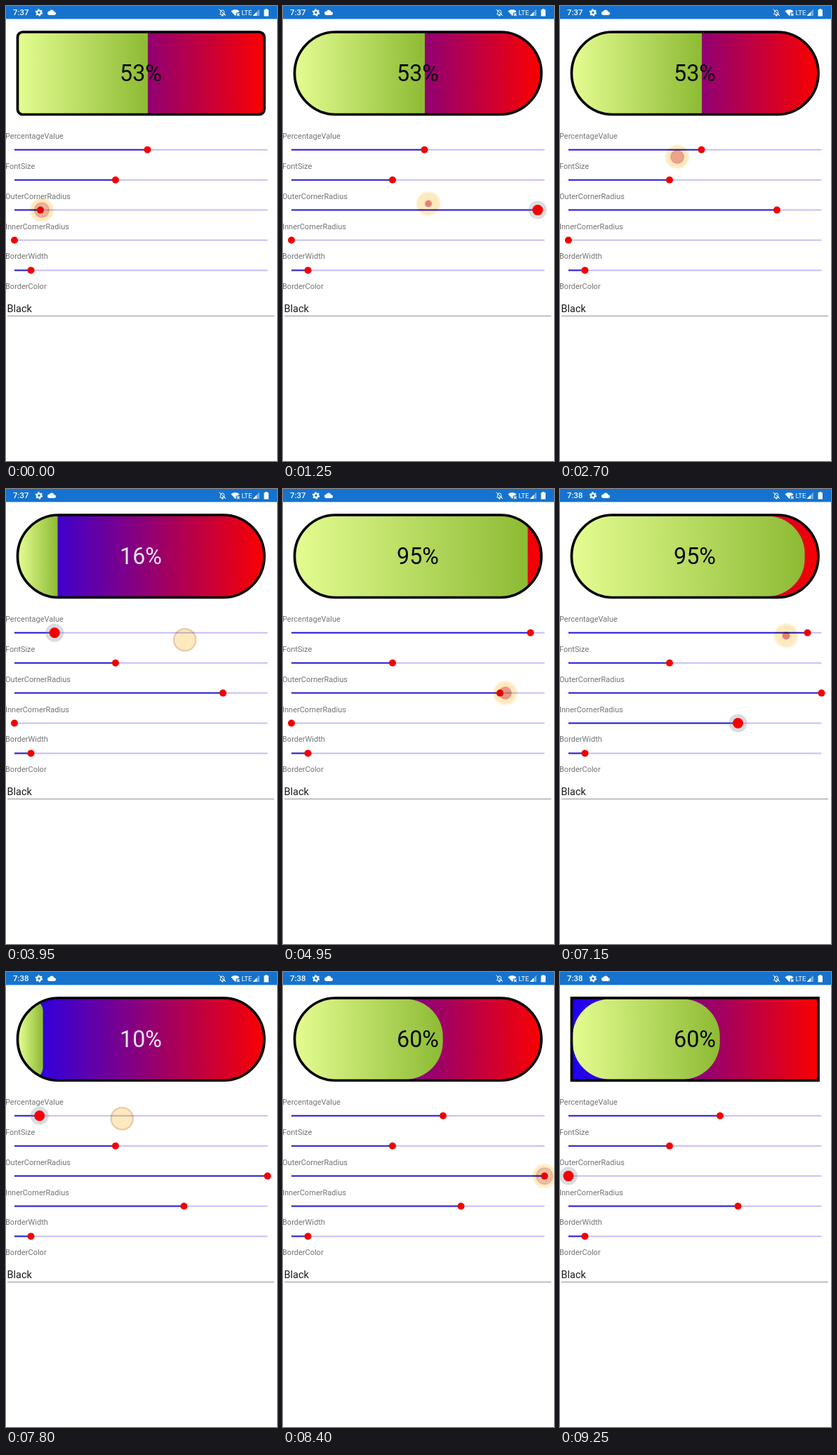
An HTML page for the animation above (9300 ms loop, 386 px wide and 648 px high).

```html
<!DOCTYPE html>
<html lang="en">
<head>
<meta charset="utf-8">
<title>Progress bar settings</title>
<style>
html, body { margin: 0; width: 100%; height: 100%; overflow: hidden; background: #fff; }
svg { display: block; width: 100%; height: 100%; font-family: Roboto, "Open Sans", sans-serif; }
#pointer { mix-blend-mode: multiply; }
</style>
</head>
<body>
<svg id="stage" viewBox="0 0 386 648">
  <defs>
    <linearGradient id="green"><stop stop-color="#e4fc91"/><stop offset="1" stop-color="#8dbb34"/></linearGradient>
    <linearGradient id="heat"><stop stop-color="#1c00f4"/><stop offset="1" stop-color="#fa0000"/></linearGradient>
    <radialGradient id="glow">
      <stop offset=".8" stop-color="#fde8ba" stop-opacity=".95"/>
      <stop offset="1" stop-color="#fde8ba" stop-opacity=".2"/>
    </radialGradient>
    <clipPath id="shape"><rect id="mask" x="16.5" y="37" width="351.5" height="117.5"/></clipPath>
  </defs>
  <rect width="386" height="648" fill="#fff"/>
  <rect width="386" height="18.5" fill="#1573cf"/>
  <g fill="#fff">
    <text id="clock" x="10" y="13" font-size="11.4" font-weight="500"></text>
    <circle cx="47" cy="9.3" r="2.8" fill="none" stroke="#fff" stroke-width="2.2"/>
    <circle cx="47" cy="9.3" r="4.5" fill="none" stroke="#fff" stroke-width="1.5" stroke-dasharray="2.356"/>
    <path d="M62 13a2.8 2.8 0 0 1-.2-5.6 3.7 3.7 0 0 1 6.8.8 2.4 2.4 0 0 1 .2 4.8z"/>
    <path d="M304.7 12h7l-1-1.5V8.5a2.6 2.6 0 0 0-5.2 0v2z" fill="none" stroke="#fff"/>
    <path d="M307 13h2.4l-1.2 1.5zM303.5 4.500l9.500 9.500" stroke="#fff"/>
    <path d="M320.5 7.2q6-4.5 12 0l-2 2.3h-2.800v3.500l-1.200 1z"/>
    <path d="M329 10.5l3.500 3.500m0-3.500l-3.500 3.500" stroke="#fff" stroke-width="1.2"/>
    <text x="335.5" y="13" font-size="9.5">LTE</text>
    <path d="M361 4.5v9.500h-9.500z" opacity=".4"/>
    <path d="M357 8.5v5.500h-5.500z"/>
    <path d="M369.3 4h3v1.200h1.700v9.300h-6.500V5.200h1.800z"/>
  </g>
  <g clip-path="url(#shape)">
    <rect x="16" y="36" width="353" height="120" fill="url(#heat)"/>
    <rect id="fill" x="18" y="38.5" height="114.5" fill="url(#green)"/>
  </g>
  <rect id="border" x="16.5" y="37" width="351.5" height="117.5" fill="none" stroke="#000" stroke-width="3.7"/>
  <text id="label" x="192" y="107" font-size="32.3" text-anchor="middle"></text>
  <g id="rows"></g>
  <text x="1.5" y="436" font-size="14.5" fill="#1c1c1c">Black</text>
  <path d="M2 441.500H382" stroke="#929292"/>
  <g id="pointer">
    <circle r="18" fill="url(#glow)"/>
    <circle id="ring" fill="#d84848" stroke="#c87878" stroke-width="2" stroke-opacity=".35"/>
  </g>
</svg>
<script>
const LOOP = 9300, LEFT = 12, SPAN = 360.5, TOP = 204.8, PITCH = 42.9;
const STEP = 450;    // one stroke of a drag
const LAG = 167;     // the thumb trails the finger
const PRESS = 100;   // delay of the pressed look
const TRAVEL = 300;  // longest move between drags
const PULSE = 226.5;

const $ = id => document.getElementById(id);
const set = (el, attrs) => { for (const k in attrs) el.setAttribute(k, attrs[k]); };
const add = (tag, attrs) => {
  const el = document.createElementNS($("stage").namespaceURI, tag);
  set(el, attrs);
  return $("rows").appendChild(el);
};
const clamp = (v, lo = 0, hi = 1) => Math.min(hi, Math.max(lo, v));
const mix = (a, b, u) => a + (b - a) * (1 - Math.cos(Math.PI * clamp(u))) / 2;

const rows = ["PercentageValue", "FontSize", "OuterCornerRadius", "InnerCornerRadius", "BorderWidth", "BorderColor"]
  .map((name, i) => ({ name, y: TOP + PITCH * i }));
const [percent, font, outer, inner, width] = rows;
percent.home = 201.5;
font.home = 156;
outer.home = 49;
inner.home = LEFT;
width.home = 35.5;

for (const row of rows) {
  add("text", { x: -1, y: row.y - 16, "font-size": 11, fill: "#747474" }).textContent = row.name;
  if (!row.home) continue;
  add("path", { d: `M${LEFT} ${row.y}h${SPAN}`, stroke: "#c3bff5", "stroke-width": 2 });
  row.line = add("path", { stroke: "#2c20cf", "stroke-width": 2 });
  row.halo = add("circle", { cy: row.y, r: 13, fill: "#808090", "fill-opacity": .28 });
  row.thumb = add("circle", { cy: row.y, fill: "#f20000" });
}

// Each drag runs through its stops, one stroke per STEP.
const drag = (row, at, dy, ...stops) => ({
  row, at, stops, y: row.y + dy, end: at + STEP * (stops.length - 1)
});
const drags = [
  drag(outer, 588, -9, 49, 372, 12, 12, 309),
  drag(percent, 3213, 10, 167, 12, 352.5),
  drag(outer, 4850, 0, 309, 372.5),
  drag(inner, 6005, 9, 12, 372, 253.5),
  drag(percent, 7064, 4, 352.5, 12, 228),
  drag(outer, 8550, 0, 372.5, 12)
];

function dragX({ at, stops }, t) {
  const p = clamp((t - at) / STEP, 0, stops.length - 1);
  const i = Math.min(Math.floor(p), stops.length - 2);
  return mix(stops[i], stops[i + 1], p - i);
}

function fingerAt(t) {
  let from = { x: 51, y: outer.y, t: 0 };
  for (const d of drags) {
    if (t < d.at) {
      const u = (t - from.t) / Math.min(TRAVEL, d.at - from.t);
      return { x: mix(from.x, d.stops[0], u), y: mix(from.y, d.y, u) };
    }
    from = { x: dragX(d, t), y: d.y, t: d.end };
  }
  return from;
}

function drawRow(row, t) {
  const seen = t - LAG;
  const own = drags.filter(d => d.row === row);
  const last = own.filter(d => d.at <= seen).pop();
  const x = last ? dragX(last, seen) : row.home;
  const down = own.some(d => seen - PRESS >= d.at && seen - PRESS < d.end);
  row.value = (x - LEFT) / SPAN;
  set(row.line, { d: `M${LEFT} ${row.y}H${x}` });
  set(row.thumb, { cx: x, r: down ? 7.5 : 5 });
  set(row.halo, { cx: x, visibility: down ? "visible" : "hidden" });
}

function drawBar() {
  const value = percent.value, w = value * 350;
  const rx = clamp(outer.value * 72, 0, 58.75);
  set($("mask"), { rx });
  set($("border"), { rx });
  set($("fill"), { width: w, rx: clamp(inner.value * 80, 0, Math.min(w / 2, 57.25)) });
  set($("label"), { fill: value < .5 ? "#e8e6f6" : "#080808" });
  $("label").textContent = Math.ceil(value * 100) + "%";
}

function drawPointer(t) {
  const { x, y } = fingerAt(t);
  const gone = drags[drags.length - 1].end;
  set($("pointer"), { transform: `translate(${x} ${y})`, opacity: clamp(1 - (t - gone) / 150) });
  const r = 4 + 12 * ((t / PULSE + .52) % 1);
  set($("ring"), { r, "fill-opacity": .65 * clamp((14 - r) / 7) });
}

function render(t) {
  $("clock").textContent = t < 5000 ? "7:37" : "7:38";
  rows.filter(row => row.home).forEach(row => drawRow(row, t));
  drawBar();
  drawPointer(t);
}

const start = performance.now();
function tick() {
  render((performance.now() - start) % LOOP);
  requestAnimationFrame(tick);
}
tick();
</script>
</body>
</html>
```
